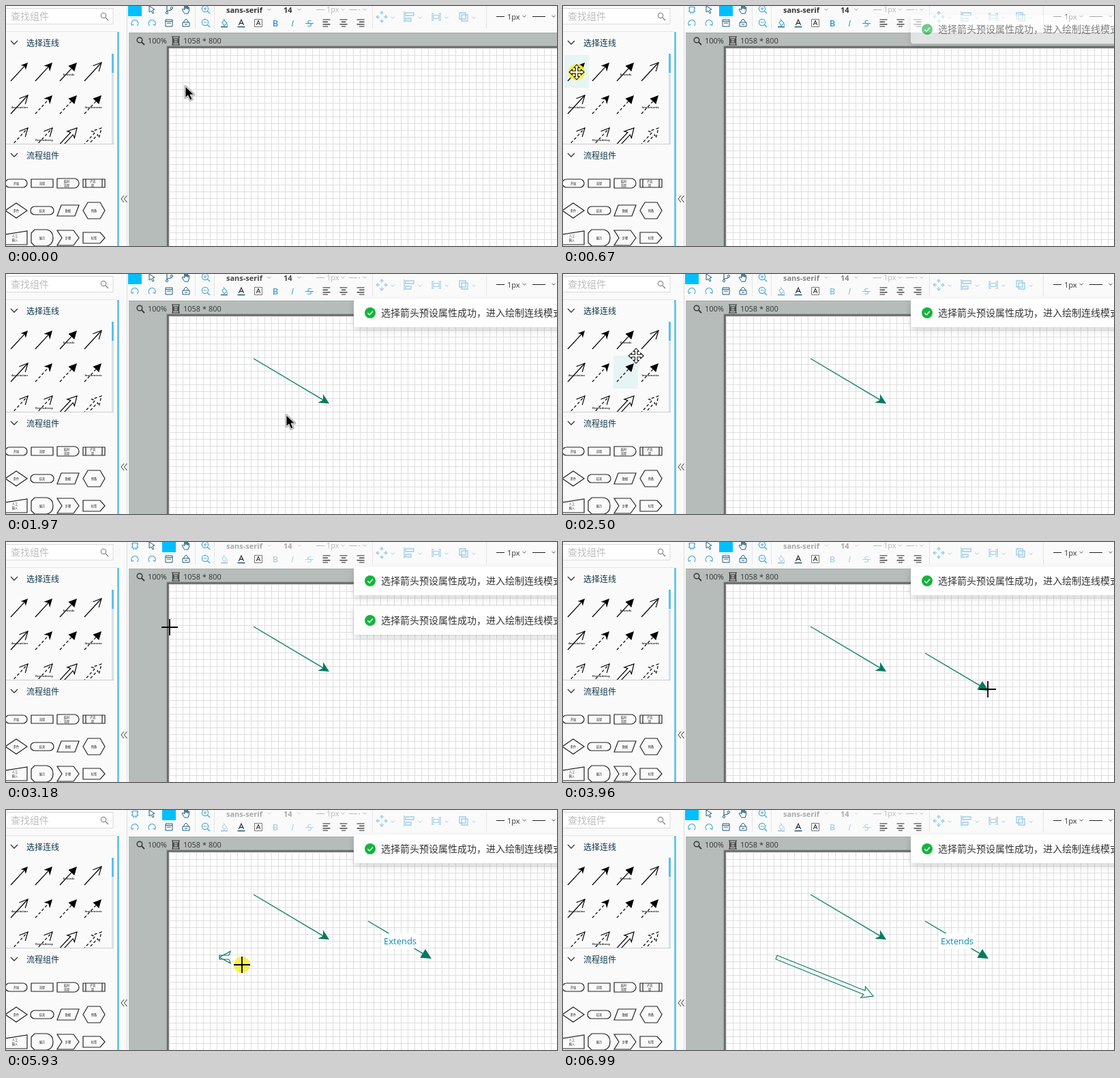
These frames come from a looping animation (808x352 px, 7.06 s). An HTML page:

```html
<!DOCTYPE html>
<html lang="zh">
<head>
<meta charset="utf-8">
<title>Diagram editor</title>
<style>
html, body { margin: 0; width: 100%; height: 100%; overflow: hidden; background: #fafafa; }
svg { display: block; width: 808px; height: 352px; }
text { font-family: "Open Sans", "Noto Sans CJK SC", "Noto Sans CJK", sans-serif; }
.ui { font-size: 11px; fill: #333; }
.tiny { font-size: 4.2px; fill: #222; text-anchor: middle; }
</style>
</head>
<body>
<svg id="stage" viewBox="0 0 808 352" xmlns="http://www.w3.org/2000/svg"></svg>
<script>
const LOOP = 7060, STEP = 130;
const BLUE = '#4aa9dc', NAVY = '#1f5f80', GREEN = '#047a5e', LIGHT = '#9fcdea', INK = '#222';
const stage = document.getElementById('stage');

const path = (d, color = INK, w = 1, extra = '') =>
  `<path d="${d}" fill="none" stroke="${color}" stroke-width="${w}" ${extra}/>`;
const rect = (x, y, w, h, fill, extra = '') =>
  `<rect x="${x}" y="${y}" width="${w}" height="${h}" fill="${fill}" ${extra}/>`;
const text = (x, y, s, extra = 'class="ui"') => `<text x="${x}" y="${y}" ${extra}>${s}</text>`;
const at = (x, y, s, extra = '') => `<g transform="translate(${x} ${y})" ${extra}>${s}</g>`;
const caret = (x, y, color = '#999') => path(`M${x - 2.5} ${y - 1.2}l2.5 2.5l2.5 -2.5`, color);

// Arrow from (x1,y1) to (x2,y2); heads: barb, tri, open, hollow
function arrow(x1, y1, x2, y2, head, o = {}) {
  const { color = '#000', size = 11, w = 1.2, dash = '' } = o;
  const len = Math.hypot(x2 - x1, y2 - y1);
  const deg = len < 1 ? 180 : Math.atan2(y2 - y1, x2 - x1) * 180 / Math.PI;
  const half = size * (head === 'hollow' ? .55 : .5), b = len - size;
  const dashed = dash && `stroke-dasharray="${dash}"`;
  let s;
  if (head === 'hollow') {
    const n = b + 2, k = size > 14 ? 3 : 2.4;
    s = path(`M0 ${-k}L${n} ${-k}L${b} ${-half}L${len} 0L${b} ${half}L${n} ${k}L0 ${k}Z`, color, w, dashed);
  } else if (head === 'open') {
    s = path(`M0 0H${len}`, color, w, dashed) + path(`M${b} ${-half}L${len} 0L${b} ${half}`, color, w);
  } else {
    const n = head === 'barb' ? b + size * .3 : b;
    s = path(`M0 0H${n}`, color, w, dashed) +
      `<path d="M${len} 0L${b} ${-half}L${n} 0L${b} ${half}Z" fill="${color}"/>`;
  }
  return `<g transform="translate(${x1} ${y1}) rotate(${deg})">${s}</g>`;
}

const lens = (sign, color) => `<circle r="4.6" fill="none" stroke="${color}" stroke-width="1.2"/>` +
  path('M3.4 3.4L7 7', color, 1.4) + path(sign, color);

function toolIcons() {
  const undo = path('M-4.5 3A5 5 0 1 1 3.5 4M-5.5 0l1 3.4l3 -1.4', BLUE, 1.2);
  const align = (a, b) => path(`M-5.5 -5H5.5M${a} -1.6H${b}M-5.5 1.8H5.5M${a} 5H${b}`, INK, 1.2);
  return at(214, 5, path('M-4 -5L4 0L.8 1.2L3 5L1 6L-1 2L-4 4Z', NAVY)) +
    at(264, 5, path('M-3 5L-6 0L-4.5 -1L-2.5 1V-4.5H-.8V-1V-5.5H1V-1V-4.5H2.7V0V-3H4.5V2L3 6H-3', NAVY)) +
    at(292, 4, lens('M-2.4 0H2.4M0 -2.4V2.4', BLUE)) +
    at(292, 24, lens('M-2.4 0H2.4', BLUE)) +
    at(189, 25, undo) + at(214, 25, undo, 'transform-origin="0 0"').replace('translate(214 25)', 'translate(214 25) scale(-1 1)') +
    at(239, 25, path('M-5 -5H5V5H-5ZM-3 0H3M-5 -2.5H5', NAVY)) +
    at(264, 25, path('M-5 -1H5V5H-5ZM-3 -1V-3L0 -6L3 -3V-1M-2 2H2', NAVY)) +
    at(345, 25, path('M-3.6 3L0 -5L3.6 3M-2.4 .4H2.4', INK, 1.1) + path('M-5.5 5.6H5.5', NAVY, 1.6)) +
    at(370, 25, path('M-5.5 -5.5H5.5V5.5H-5.5Z', '#777') + path('M-2.8 3L0 -3.8L2.8 3M-1.8 .8H1.8')) +
    at(470, 25, align(-5.5, 2)) + at(495, 25, align(-3, 3)) + at(520, 25, align(-2, 5.5));
}

function fontTools() {
  const glyph = (x, s, extra) => text(x, 30, s, `font-size="13" fill="#2d95d0" text-anchor="middle" ${extra}`);
  const bold = 'class="ui" font-weight="700"';
  return text(323, 10, 'sans-serif', bold) + text(407, 10, '14', bold) +
    caret(386, 5) + caret(430, 5) +
    at(320, 25, path('M-3 -1L0 -4L4 0L0 4ZM-1 -6L1 -3M4.5 1.5V4', BLUE, 1.2) + path('M-5 5.6H5', NAVY, 1.5)) +
    glyph(395, 'B', 'font-weight="600"') + glyph(420, 'I', 'font-style="italic"') +
    glyph(445, 'S') + path('M439 25.5H451', '#2d95d0');
}

function arrangeTools() {
  const pale = path('M455 5.5H467M503 5.5H515M517 5.5H519', '#bbb') + text(470, 9, '1px', 'font-size="11" fill="#bbb"') +
    caret(494, 5, '#bbb') + caret(526, 5, '#bbb');
  const cross = path('M-7 0H-3M3 0H7M0 -7V-3M0 3V7M-5 -2.5L-8 0L-5 2.5M5 -2.5L8 0L5 2.5M-2.5 -5L0 -8L2.5 -5M-2.5 5L0 8L2.5 5', LIGHT, 1.3);
  return pale + at(551, 16, cross) +
    at(591, 16, path('M-7 -8V8M-5 -6H7V-2H-5ZM-5 2H3V6H-5Z', LIGHT, 1.3)) +
    at(631, 16, path('M-6 -6V6M6 -6V6M-6 -5H-3M-6 5H-3M6 -5H3M6 5H3M-4 -2.5H4V2.5H-4Z', LIGHT, 1.2)) +
    at(671, 16, path('M-6 -6H3V3H-6ZM-3 -3H6V6H-3Z', LIGHT, 1.4)) +
    [567, 607, 646, 686].map(x => caret(x, 17, LIGHT)).join('') +
    path('M719 15.5H731M772 15.5H791', INK, 1.2) + text(735, 20, '1px') + caret(760, 15, '#555') + caret(803, 15, '#555') +
    path('M277.5 0V33M305.5 0V33M537.5 0V33M704.5 0V33', '#e4e4e4');
}

function lineList() {
  const kinds = ['barb', 'barb', 'tri', 'open', 'open', 'barb', 'tri', 'tri', 'open', 'open', 'hollow', 'hollow'];
  const labels = { 2: 'Extends', 4: 'Association', 7: 'Implements', 9: 'Dependency' };
  const dashed = [5, 6, 7, 8, 9, 11];
  return kinds.map((kind, i) => {
    const x = 2 + i % 4 * 36, y = 72 + (i / 4 | 0) * 48;
    const size = kind === 'hollow' ? 13 : i === 0 ? 10 : 12;
    return arrow(x + 5, y + 38, x + 30, y + 11, kind, { size, dash: dashed.includes(i) ? '4 3' : '' }) +
      (labels[i] ? text(x + 18, y + 30, labels[i], 'class="tiny" font-weight="700"') : '');
  }).join('');
}

function flowShapes() {
  const shapes = [
    ['M-10 -6H10A6 6 0 0 1 10 6H-10A6 6 0 0 1 -10 -6Z', '开始'],
    ['M-16 -6H16V6H-16Z', '流程'],
    ['M-16 -7H9A7 7 0 0 1 9 7H-16Z', '临时', '流程'],
    ['M-16 -6H16V6H-16ZM-12 -6V6M12 -6V6', '子流', '程'],
    ['M-16 0L0 -11L16 0L0 11Z', '条件'],
    ['M-11 -6H11A6 6 0 0 1 11 6H-11A6 6 0 0 1 -11 -6Z', '结束'],
    ['M-10 -8H16L10 8H-16Z', '数据'],
    ['M-16 0L-9 -12H9L16 0L9 12H-9Z', '预备'],
    ['M-16 -5L16 -10V10H-16Z', '人工', '输入'],
    ['M-11 -12H7Q16 -10 16 0Q16 10 7 12H-11L-16 7V-7Z', '展示'],
    ['M-16 -11H8L16 0L8 11H-16L-9 0Z', '步骤'],
    ['M-16 -8H9L16 0L9 8H-16Z', '标签']
  ];
  return shapes.map(([d, a, b], i) => at(15 + i % 4 * 38, 260 + (i / 4 | 0) * 40, path(d, INK, 1.2) +
    (b ? text(-2, -1, a, 'class="tiny"') + text(-2, 4.6, b, 'class="tiny"') : text(0, 1.7, a, 'class="tiny"')))).join('');
}

function sidebar() {
  const head = (y, s) => path(`M7 ${y - 3}l5 5l5 -5`, '#333', 1.3) + text(30, y + 4.5, s, 'font-size="12" fill="#12384a"');
  return rect(0, 0, 178, 352, '#fafafa') +
    rect(-3, 3.5, 160, 23, '#fff', 'stroke="#d9d9d9"') + text(7, 20, '查找组件', 'font-size="14" fill="#bdbdbd"') +
    at(143, 14, '<circle r="3.8" fill="none" stroke="#777"/>' + path('M2.8 2.8L7 7', '#777', 1.2)) +
    path('M0 37.5H163', '#e6e6e6') + head(54, '选择连线') + head(219, '流程组件') +
    '<g clip-path="url(#list)"><rect id="hover" width="36" height="48" fill="#e6f4f4"/>' + lineList() + '</g>' +
    rect(155, 70, 3, 132, '#d5e2e8') + rect(155, 70, 3, 28, '#5cbfea') +
    path('M0 202.5H158', '#ccc') + flowShapes() +
    rect(163, 38, 3, 314, '#6cc6e6') + path('M177.5 0V352', '#ddd') +
    path('M173 278l-4 5l4 5M177.5 278l-4 5l4 5', '#333');
}

function canvas() {
  return rect(180, 39, 628, 313, '#b6bcba') + path('M180 39.5H808', '#a4aaa8') +
    [6, 4, 2].map(w => rect(238.5, 61.5, 600, 320, '#fff', `stroke="#333" stroke-width="${w}" stroke-opacity=".38"`)).join('') +
    rect(239, 62, 600, 320, '#fff') + rect(239, 62, 569, 290, 'url(#grid)') +
    at(196, 50, '<circle r="3.8" fill="none" stroke="#333" stroke-width="1.4"/>' + path('M2.8 2.8L7 7', '#333', 1.8)) +
    text(208, 55, '100%') + text(260, 55, '1058 * 800') +
    path('M243 45H255M243 57H255M244.5 45V57M253.5 45V57M246 48H252V54H246ZM246 51H252', '#333', 1.2);
}

const toast = id => `<g id="${id}">` +
  rect(510, 0, 340, 42, '#fff', 'rx="4" filter="url(#shadow)"') +
  '<circle cx="534" cy="21" r="8" fill="#14b53c"/>' + path('M530.3 21.2l2.8 2.8l4.8 -5.4', '#fff', 1.5) +
  text(550, 26, '选择箭头预设属性成功，进入绘制连线模式', 'font-size="14" fill="#333"') + '</g>';

const moveCursor = '<path d="M0 -11L4 -6.5H1.7V-1.7H6.5V-4L11 0L6.5 4V1.7H1.7V6.5H4L0 11L-4 6.5H-1.7V1.7H-6.5V4L-11 0L-6.5 -4V-1.7H-1.7V-6.5H-4Z" fill="#fff" stroke="#111" stroke-width="1.1"/>';
const tip = 'M1 1V17.5L4.8 14L8 21L11 19.6L8 13H13.5Z';

stage.innerHTML = `<defs>
  <pattern id="grid" x="239" y="62" width="10" height="10" patternUnits="userSpaceOnUse">${path('M.5 0V10M0 .5H10', '#dedede')}</pattern>
  <clipPath id="list"><rect x="0" y="72" width="155" height="130"/></clipPath>
  <filter id="shadow" x="-10%" y="-40%" width="120%" height="220%"><feDropShadow dx="0" dy="4" stdDeviation="5" flood-opacity=".16"/></filter>
  </defs>` +
  rect(0, 0, 808, 352, '#fafafa') + canvas() + '<g id="drawn"></g>' + sidebar() +
  toolIcons() + '<g id="font">' + fontTools() + '</g>' + arrangeTools() +
  '<g id="pick">' + at(189, 5, path('M-3.5 -3.5H3.5V4H-3.5ZM-5.5 -2H-3.5M-5.5 2.5H-3.5M3.5 -2H5.5M3.5 2.5H5.5M-1.5 4V6.5M1.5 4V6.5', BLUE, 1.2)) + rect(229, 0, 20, 15, '#00bfff') + '</g>' +
  '<g id="select">' + at(239, 5, path('M-3 -5V5M-3 2Q4 2 4 -2', NAVY, 1.1) + '<circle cx="4" cy="-2" r="1.6" fill="#fff" stroke="#1f5f80"/><circle cx="-3" cy="5" r="1.6" fill="#fff" stroke="#1f5f80"/>') + rect(179, 0, 20, 15, '#00bfff') + '</g>' +
  toast('toastA') + toast('toastB') + toast('toastC') +
  `<g id="cursor"><circle id="press" r="12" fill="#fbee3c" fill-opacity=".88"/>
  <g id="move">${moveCursor}</g><g id="cross">${path('M-12 0H12M0 -12V12', '#000', 1.8)}</g>
  <g id="point">${path(tip, '#bbb', 4, 'stroke-linejoin="round"')}<path d="${tip}" fill="#000" stroke="#fff" stroke-width=".8"/></g></g>`;

const el = id => document.getElementById(id);
const show = (id, on) => el(id).setAttribute('display', on ? 'inline' : 'none');
const clamp = v => Math.max(0, Math.min(1, v));
const within = (t, spans) => spans.some(([a, b]) => t >= a && t < b);

// Pointer: time, x, y
const track = [
  [0, 262, 117], [130, 247, 116], [280, 130, 106], [540, 20, 97], [930, 20, 97], [1060, 170, 130],
  [1190, 328, 159], [1320, 363, 124], [1450, 363, 124], [1710, 474, 189], [1840, 465, 200], [1970, 410, 206],
  [2230, 145, 150], [2500, 77, 96], [2780, 80, 97], [3040, 82, 97], [3180, 240, 125], [3440, 531, 163],
  [3570, 531, 163], [3830, 624, 217], [3960, 623, 216], [4090, 605, 245], [4220, 520, 265], [4610, 310, 232],
  [4740, 200, 205], [4870, 112, 180], [5010, 84, 189], [5540, 84, 189], [5670, 220, 205], [5800, 313, 216],
  [5930, 346, 227], [6340, 455, 273], [6470, 490, 290], [6730, 755, 330], [6860, 772, 345], [6990, 820, 380]
];
const lineMode = [[540, 1840], [2910, 4090], [5540, 6470]];
const pressed = [[540, 700], [1400, 1750], [2780, 2900], [3500, 3900], [5140, 5300], [5800, 6400]];
const runs = [0, 280, 2380, 2780, 3180, 5010, 5540, 6080];

function pointer(t) {
  const i = track.findIndex(k => k[0] > t);
  if (i < 0) return track[track.length - 1].slice(1);
  const [a, ax, ay] = track[i - 1], [b, bx, by] = track[i], p = (t - a) / (b - a);
  return [ax + (bx - ax) * p, ay + (by - ay) * p];
}

function drawing(t, x, y) {
  const line = (from, start, to, done, head, o) => t < start ? '' :
    arrow(...from, ...(t < done ? [x, y] : to), head, { color: GREEN, size: 15, ...o });
  let s = line([363, 124], 1400, [474, 190], 1710, 'barb') + line([531, 163], 3500, [624, 218], 3830, 'tri');
  if (t >= 4090) s += rect(551, 181, 54, 22, '#fff') + text(554, 197, 'Extends', 'font-size="13" fill="#0a86b0"');
  if (t >= 5800) s += t < 6000 ? arrow(313, 216, 313, 216, 'hollow', { color: GREEN, size: 16, w: 1.1 }) :
    line([313, 216], 5800, [455, 273], 6340, 'hollow', { size: 16, w: 1.1 });
  return s;
}

function placeToast(id, t, start, end, y) {
  const enter = clamp((t - start) / 280), leave = clamp((t - end) / 300);
  show(id, enter > 0 && leave < 1);
  el(id).setAttribute('opacity', enter * (1 - leave));
  el(id).setAttribute('transform', `translate(0 ${y - 58 * (1 - enter)})`);
  return leave;
}

function render(time) {
  const run = runs.filter(r => r <= time).pop();
  const t = run + Math.floor((time - run) / STEP) * STEP;
  const [x, y] = pointer(t), line = within(t, lineMode);
  const overList = x < 146 && x >= 2 && y >= 72 && y < 202;
  show('hover', overList);
  if (overList) {
    el('hover').setAttribute('x', 2 + Math.floor((x - 2) / 36) * 36);
    el('hover').setAttribute('y', 72 + Math.floor((y - 72) / 48) * 48);
  }
  show('pick', line);
  show('select', !line);
  el('font').setAttribute('opacity', 1 - .6 * clamp((t - 1840) / 790));
  el('drawn').innerHTML = drawing(t, x, y);
  const first = placeToast('toastA', t, 500, 3500, 36);
  const second = placeToast('toastB', t, 2890, 5600, 94 - 58 * first);
  placeToast('toastC', t, 5120, 9000, 94 - 58 * second);
  el('cursor').setAttribute('transform', `translate(${x} ${y})`);
  show('press', within(t, pressed));
  show('move', overList);
  show('cross', !overList && line);
  show('point', !overList && !line);
}

const t0 = performance.now();
function tick() {
  render((performance.now() - t0) % LOOP);
  requestAnimationFrame(tick);
}
tick();
</script>
</body>
</html>
```
